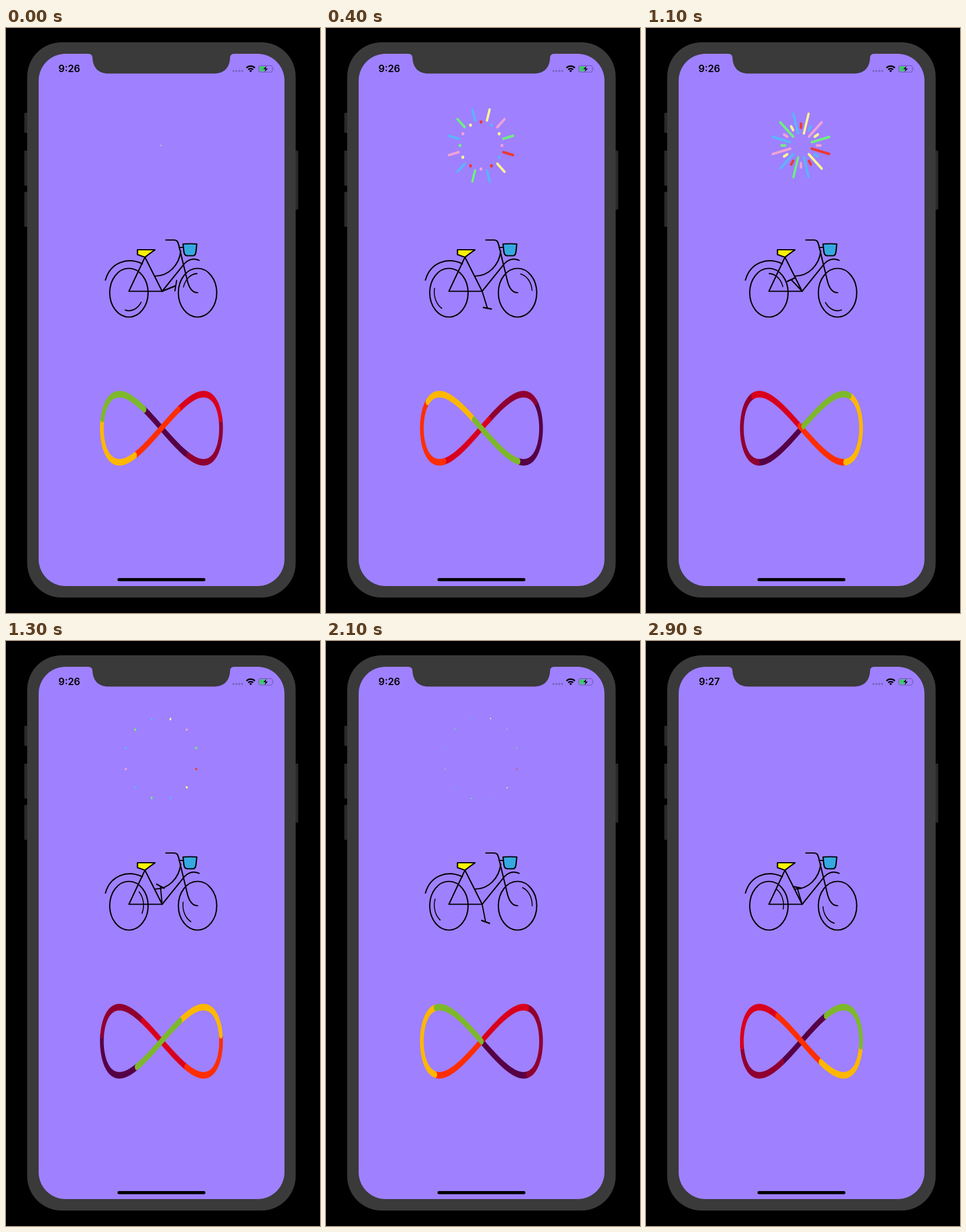
An HTML page that plays this animation: 548x1021 px, repeating every 3000 ms.

```html
<!DOCTYPE html>
<html lang="en">
<head>
<meta charset="utf-8">
<title>Phone animations</title>
<style>
  html, body { margin: 0; height: 100%; overflow: hidden; background: #000; }
  svg { display: block; width: 100%; height: 100%; }
  #clock { font: 600 17px Inter, "Liberation Sans", sans-serif; text-anchor: middle; }
  #bike { fill: none; stroke: #000; stroke-width: 2.2; stroke-linecap: round; stroke-linejoin: round; }
  #burst, #loop { fill: none; stroke-linecap: round; stroke-linejoin: round; }
</style>
</head>
<body>
<svg viewBox="0 0 548 1021">
  <g fill="#292929">
    <rect x="32" y="148" width="8" height="35" rx="1"/>
    <rect x="32" y="214" width="8" height="61" rx="1"/>
    <rect x="32" y="286" width="8" height="61" rx="1"/>
    <rect x="502" y="214" width="8" height="103" rx="1"/>
  </g>
  <rect x="37" y="25" width="468.5" height="969" rx="60" fill="#3a3a3a"/>
  <rect x="57" y="45" width="429" height="929" rx="47" fill="#9f80ff"/>
  <path fill="#3a3a3a" d="M143 44V45C149 45 151 48 151 53C152 70 162 79.500 179 79.500H363C380 79.500 390 70 391 53C391 48 393 45 399 45V44Z"/>
  <rect x="194.500" y="960" width="153.500" height="5.500" rx="2.750"/>

  <text id="clock" x="110.500" y="77">9:26</text>
  <g fill="#7f66cc">
    <circle cx="397" cy="75" r="2"/><circle cx="402" cy="75" r="2"/>
    <circle cx="407" cy="75" r="2"/><circle cx="412" cy="75" r="2"/>
  </g>
  <g fill="none" stroke="#000" stroke-width="2.500">
    <path d="M419.600 69.600A10.500 10.500 0 0 1 434.400 69.600M422.600 72.700A6.300 6.300 0 0 1 431.400 72.700"/>
    <path fill="#000" stroke="none" d="M427 77.300L424.600 74.800A3.400 3.400 0 0 1 429.400 74.800Z"/>
  </g>
  <rect x="441" y="65.500" width="24" height="11.500" rx="3" fill="none" stroke="#6a56ab"/>
  <path d="M466.700 69.300Q468.500 71.200 466.700 73.200Z" fill="#6a56ab"/>
  <rect x="442.500" y="67" width="11.500" height="8.500" rx="1.700" fill="#3bcb68"/>
  <path d="M455 65.500L448.500 72H452.500L451 77.500L457.500 70.500H453.500Z" stroke="#9f80ff" stroke-width=".6"/>

  <g id="burst" transform="translate(270.500 205) scale(1 1.120)"></g>

  <g id="bike">
    <ellipse cx="214.500" cy="462" rx="33.500" ry="42.500"/>
    <ellipse cx="334.300" cy="462" rx="33.500" ry="42.500"/>
    <path d="M173.500 440C182 409 212 399 238 411.500"/>
    <path d="M242.500 400L214.500 459.500H272.500ZM272.500 459.500L312 410.500C320 402.500 328 401.500 337 405.500"/>
    <path d="M279 370H293C299 370 300 373 302 381L316 439C319 453 325 462 334.500 462"/>
    <path d="M260 433C283 433 302 415 305 389M302 383H309"/>
    <path fill="#fff200" d="M229.500 387H260L242.500 400L229.500 395.500Z"/>
    <path fill="#35a8e0" d="M309 377Q321 376 333 377L331.500 391Q330.500 397.500 326 397.500H316Q311.500 397 310.500 391Z"/>
    <g transform="translate(214.500 461) scale(1 1.270)"><path class="shine" stroke-width="1.600"/></g>
    <g transform="translate(334.300 461) scale(1 1.270)"><path class="shine" stroke-width="1.600"/></g>
    <g transform="translate(272.500 459.500) scale(1 1.270)">
      <path id="crank" stroke-width="2" d="M0 0H25M28.600 -6.200L21.400 6.200"/>
    </g>
  </g>

  <g id="loop" transform="translate(271.300 698.500) scale(1 1.770)" stroke-width="6.500"></g>
</svg>
<script>
const $ = id => document.getElementById(id);
const add = (parent, tag, attrs) => {
  const el = document.createElementNS('http://www.w3.org/2000/svg', tag);
  set(el, attrs);
  return parent.appendChild(el);
};
const set = (el, attrs) => {
  for (const k in attrs) el.setAttribute(k, attrs[k]);
};
const clamp = x => Math.min(1, Math.max(0, x));
const easeOut = x => 1 - (1 - clamp(x)) ** 2;
const easeInOut = x => (1 - Math.cos(Math.PI * clamp(x))) / 2;

// Burst: twelve long rays and twelve short ones, clockwise from the top
const tint = { y: '#fdf592', p: '#f0a2d6', g: '#6fee82', r: '#ee382f', b: '#5cb4fb' };
const rays = (letters, turn) => [...letters].map((c, i) =>
  add($('burst'), 'line', { stroke: tint[c], transform: `rotate(${turn + i * 30})` }));
const longRays = rays('ypgrybgbpbgb', 15);
const shortRays = rays('rbypbrprygpy', 0);

function drawRays(list, inner, outer, width) {
  for (const el of list)
    set(el, { y1: -Math.min(inner, outer), y2: -outer, 'stroke-width': Math.max(0, width) });
}

function drawBurst(t) {
  const p = t % 780;
  const shown = p < 560;
  $('burst').style.display = shown ? '' : 'none';
  if (!shown) return;
  drawRays(longRays, 64.8 * easeInOut((p - 180) / 380), 65.3 * easeOut(p / 600),
    Math.min(4, 1.6 + p / 50, 0.8 + (560 - p) / 18));
  drawRays(shortRays, 37 * easeInOut((p - 180) / 210), 37 * easeOut(p / 444),
    p < 400 ? 1 + p / 100 : 5 * (1 - (p - 400) / 100));
}

// Bike: crank and wheel highlights turn together
const shines = document.querySelectorAll('.shine');
const highlight = [87, 250];
const rad = 36 * Math.PI / 180, sx = 25.5 * Math.cos(rad), sy = 25.5 * Math.sin(rad);
shines.forEach(el => set(el, { d: `M${sx} ${-sy}A25.5 25.5 0 0 1 ${sx} ${sy}` }));

function drawBike(t) {
  const angle = -18 + t * 0.2162;
  set($('crank'), { transform: `rotate(${angle})` });
  shines.forEach((el, i) => set(el, { transform: `rotate(${angle + highlight[i]})` }));
}

// Infinity: six equal dashes chase each other along a figure eight
const steps = 160;
const eight = 'M' + Array.from({ length: steps }, (_, i) => {
  const a = i / steps * 2 * Math.PI;
  return `${(104 * Math.sin(a)).toFixed(2)} ${(33.6 * Math.sin(2 * a)).toFixed(2)}`;
}).join('L') + 'Z';
const bands = ['#560045', '#8f0030', '#d9001d', '#ff2e00', '#ffb700', '#7db82b'].map(stroke =>
  add($('loop'), 'path', { d: eight, stroke, pathLength: 6, 'stroke-dasharray': '1 5' }));

function drawLoop(t) {
  const head = 6 * (-0.066 + t * 0.000508);
  bands.forEach((el, i) => {
    const tail = head - 6 + i;
    set(el, { 'stroke-dashoffset': ((-tail % 6) + 6) % 6 });
  });
}

const start = performance.now();
function frame() {
  // The motion advances in 100 ms steps, with a small lead against timer jitter
  const t = Math.floor((performance.now() - start + 15) / 100) * 100 % 3000;
  $('clock').textContent = t < 2300 ? '9:26' : '9:27';
  drawBurst(t);
  drawBike(t);
  drawLoop(t);
  requestAnimationFrame(frame);
}
frame();
</script>
</body>
</html>
```
